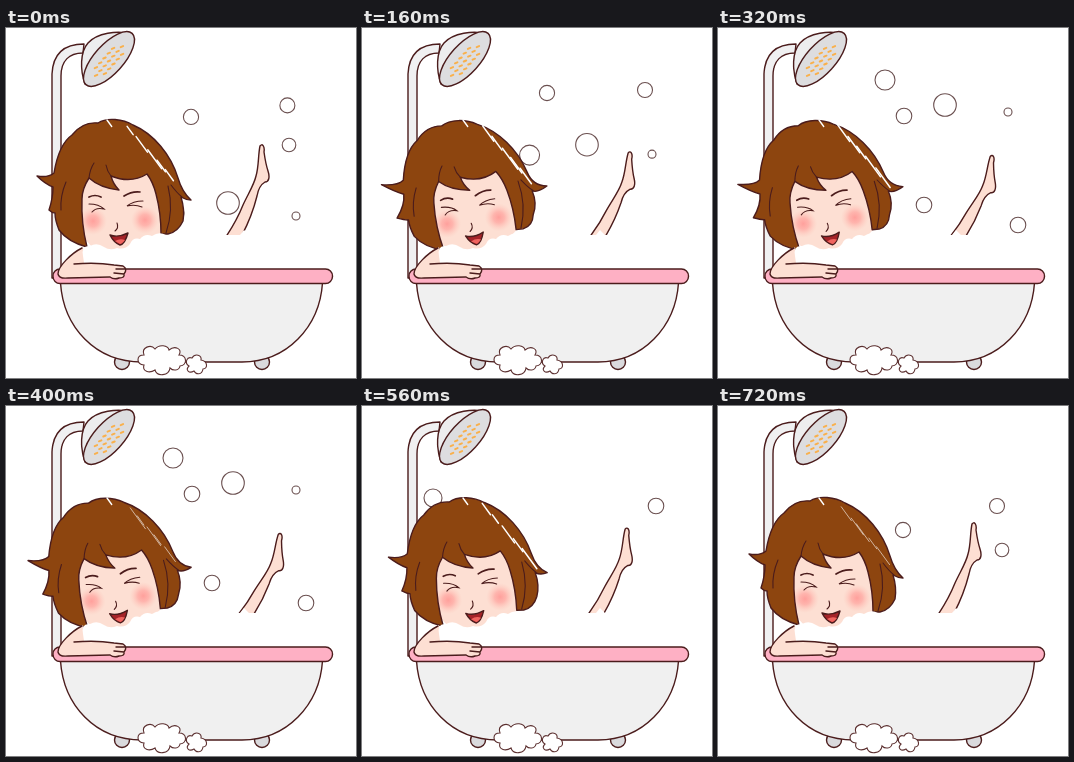
Recreate the animation shown at these times as an HTML page. Size 350 px wide and 350 px high, loop 800 ms.

```html
<!DOCTYPE html>
<html lang="en">
<head>
<meta charset="utf-8">
<title>Bath time</title>
<style>
html, body { margin: 0; width: 100%; height: 100%; overflow: hidden; background: #fff; }
svg { display: block; width: 100vw; height: 100vh; }
.ink { stroke: #4b1c1c; stroke-width: 1.4; stroke-linejoin: round; stroke-linecap: round; }
.thin { stroke: #4b1c1c; stroke-width: 1.1; stroke-linecap: round; fill: none; }
.brow { stroke-width: 1.7; }
.arm { stroke-width: 1.4; }
.skin { fill: #fddfd3; }
.foam { stroke: #5c3030; stroke-width: 1.1; fill: #fff; }
#bubbles circle { fill: #fff; stroke: #6b5050; stroke-width: 1.1; }
#holes { stroke: #f9b04b; stroke-width: 2; stroke-linecap: round; }
#water { stroke: #fff; stroke-linecap: round; }
</style>
</head>
<body>
<svg viewBox="0 0 350 350">
  <defs>
    <radialGradient id="blush">
      <stop offset="0" stop-color="#ffa09c"/>
      <stop offset=".4" stop-color="#ffaaa4" stop-opacity=".8"/>
      <stop offset="1" stop-color="#ffc8bc" stop-opacity="0"/>
    </radialGradient>
    <clipPath id="above"><path d="M200 100H300V207H243L238 202L234 207H200Z"/></clipPath>
  </defs>

  <g class="ink">
    <path fill="#f0f0f1" d="M46 250V46C47 25 58 16 78 16L77 25C63 25 55 33 55 48V250Z"/>
    <path fill="#ededee" d="M79 56C74 42 74 24 82 15C91 5 111 2 126 6Z"/>
    <ellipse cx="103" cy="31" rx="34.500" ry="14.500" fill="#dddddf" transform="rotate(-48 103 31)"/>
  </g>
  <g id="holes"></g>

  <g id="bubbles"></g>

  <g clip-path="url(#above)">
    <path id="leg" class="ink skin" d="M254 118C256 115 259 118 258 124C259 131 260 137 262 143C264 149 263 154 259 154C254 157 252 162 251 168C247 184 242 196 235 209L227 224L212 220C224 204 231 192 237 177C242 166 248 157 250 148C253 138 252 127 254 118Z"/>
  </g>

  <g id="head">
    <path class="skin" d="M72 138H148L156 175V206Q148 214 132 219Q112 229 92 223Q74 212 72 190Z"/>
    <circle cx="87" cy="193" r="14" fill="url(#blush)"/>
    <circle cx="139" cy="192" r="14" fill="url(#blush)"/>
    <path class="thin" d="M83 176Q93 176 98 181Q90 179 86 184M137 173Q127 173 121 178Q129 176 136 179M111 195Q113 200 109 203"/>
    <path class="thin brow" d="M83 169Q89 166 95 169M118 168Q126 163 134 164"/>
    <path class="ink" fill="#a52328" d="M104 207Q112 210 122 205Q119 216 114 217Q108 215 104 207Z"/>
    <path fill="#f0645f" d="M109 213Q114 210 119 212Q116 216 114 216Z"/>
    <path id="hair" class="ink" fill="#8d450f"/>
    <path class="thin" d="M83 150Q84 141 88 135M105 148Q101 143 100 137M60 154Q54 168 55 182M162 158Q168 182 160 205M165 157Q171 165 176 169"/>
  </g>
  <g id="water"></g>

  <g class="ink">
    <circle cx="116" cy="334" r="7.500" fill="#dadadd"/>
    <circle cx="256" cy="334" r="7.500" fill="#dadadd"/>
    <path fill="#f0f0f0" d="M54.500 255C57.500 299 89 334 136 334H236C281 334 313.500 299 316.500 255Z"/>
    <rect x="47" y="241" width="279.500" height="14.500" rx="7" fill="#feb0c4"/>
  </g>

  <path class="skin" d="M77 219C66 225 52 239 52 246Q53 251 62 250H113Q119 250 119 246Q122 241 117 238L106 236H80Z"/>
  <path fill="#fff" d="M77 228Q75 217 84 218Q91 214 98 219Q104 223 111 220Q119 222 124 216Q127 209 134 211Q139 205 146 208Q153 203 160 207L178 214V237H108Q92 234 78 235Z"/>
  <path class="thin arm" d="M76 220C66 225 52 238 52 246Q53 251 62 250L104 249Q108 252 113 250Q119 250 118 246Q122 241 117 238L108 237Q90 234 68 236M108 245L118 246M110 241H119"/>

  <g class="foam">
    <path d="M138 337C130 336 130 327 138 327C135 319 145 316 149 321C153 316 162 317 163 322C169 317 177 321 173 327C181 327 182 337 174 338C173 343 167 343 164 340C163 348 151 349 149 342C143 346 136 343 138 337Z"/>
    <path d="M183 338C178 335 181 328 186 330C189 325 196 327 195 332C202 333 202 341 197 341C196 347 190 347 188 343C183 346 179 342 183 338Z"/>
  </g>
</svg>
<script>
const STEP = 80, COUNT = 10, PHASES = 5;
const $ = id => document.getElementById(id);
const mix = (a, b, t) => a + (b - a) * t;

// Repeatable noise in 0..1.
const noise = n => {
  const v = Math.sin(n * 12.9898 + 4.1) * 43758.5453;
  return v - Math.floor(v);
};

// Both swings go out in three steps; the head drifts back slowly, the leg rests first.
const tilt = i => Math.min(Math.sin(Math.min(i, 3) * Math.PI / 6), (9 - i) / 6);
const swing = i => Math.min(1, i / 3, (9 - i) / 4);

// A bubble is born in one phase and climbs for `life` more; bend below 1 slows it down.
const bubble = (r, born, life, x, y, x2 = x, y2 = y, bend = .75) =>
  ({ r, born, life, x, y, x2, y2, bend });
const bubbles = [
  bubble(11.3, 0, 2, 222, 175, 227, 77),
  bubble(4, 0, 2, 290, 188, 290, 84),
  bubble(10, 0, 2, 168, 185, 167, 52, 1.2),
  bubble(7.8, 2, 0, 186, 88),
  bubble(7.8, 2, 0, 206, 177),
  bubble(7.8, 2, 1, 300, 197, 294, 100),
  bubble(9, 3, 0, 71, 92),
  bubble(7.6, 4, 2, 185, 124, 185, 65),
  bubble(7.5, 4, 2, 279, 100, 283, 62),
  bubble(6.8, 4, 1, 284, 144, 283, 117)
];

function bubbleAt(b, phase) {
  const age = (phase - b.born + PHASES) % PHASES;
  if (age > b.life) return "";
  const t = b.life ? (age / b.life) ** b.bend : 0;
  return `<circle cx="${mix(b.x, b.x2, t)}" cy="${mix(b.y, b.y2, t)}" r="${b.r}"/>`;
}

function hairPath(s) {
  const at = (x, y, dx, dy) => `${x + dx * s} ${y + dy * s}`;
  const leftTip = at(31, 148, -6, -1);
  return `M${leftTip}Q42 150 48 145C51 127 56 114 66 107
    C73 98 82 94 92 95C101 89 117 91 127 97C148 106 165 127 172 150
    Q176 164 ${at(185, 172, 6, -7)}Q180 172 175 169
    Q179 182 ${at(177, 193, -4, 0)}Q172 204 162 206L155 206
    Q155 185 150 166Q147 154 141 146Q125 156 105 148Q107 156 113 162
    Q94 160 83 150Q76 161 76 171Q75 195 81 219
    Q62 214 53 202Q49 192 49 185Q46 185 ${at(43, 182, -6, 0)}
    Q47 170 47 159Q39 156 ${leftTip}Z`;
}

const streak = (x, y, len, width) =>
  `<path d="M${x} ${y}l${len * .59} ${len * .81}" stroke-width="${width}"/>`;

// Water runs down the right side of the hair; every fourth step it thins out.
function rain(i) {
  const width = i % 4 === 1 ? .6 : 1.5;
  let out = streak(101, 92, 8, 1.4);
  for (let k = 0; k < 5; k++) {
    const n = i * 5 + k;
    const t = (k + noise(n) * .6) / 5;
    out += streak(mix(119, 165, t), mix(96, 148, t), mix(10, 26, noise(n + 70)), width);
  }
  return out;
}

function holes() {
  let out = "";
  for (let row = -1; row <= 1; row++) {
    for (let k = -3; k <= 3; k++) {
      const x = 103 + k * 4.3 + row * 4.5, y = 33 - k * 4.8 + row * 3;
      if (row && Math.abs(k) === 3) continue;
      out += `<path d="M${x - 1.2} ${y + .5}l2.4 -1"/>`;
    }
  }
  return out;
}

function draw(time) {
  const i = Math.floor(time / STEP) % COUNT;
  const s = tilt(i), w = swing(i), phase = i >> 1;
  $("head").setAttribute("transform", `rotate(${-7 * s} 113 212)`);
  $("hair").setAttribute("d", hairPath(s));
  $("leg").setAttribute("transform", `translate(${18 * w} ${10.5 * w}) rotate(${7 * w} 255 120)`);
  $("bubbles").innerHTML = bubbles.map(b => bubbleAt(b, phase)).join("");
  $("water").innerHTML = rain(i);
}

let start;
function tick(now) {
  start ??= now;
  draw(Math.max(0, now - start));
  requestAnimationFrame(tick);
}
$("holes").innerHTML = holes();
draw(0);
requestAnimationFrame(tick);
</script>
</body>
</html>
```
